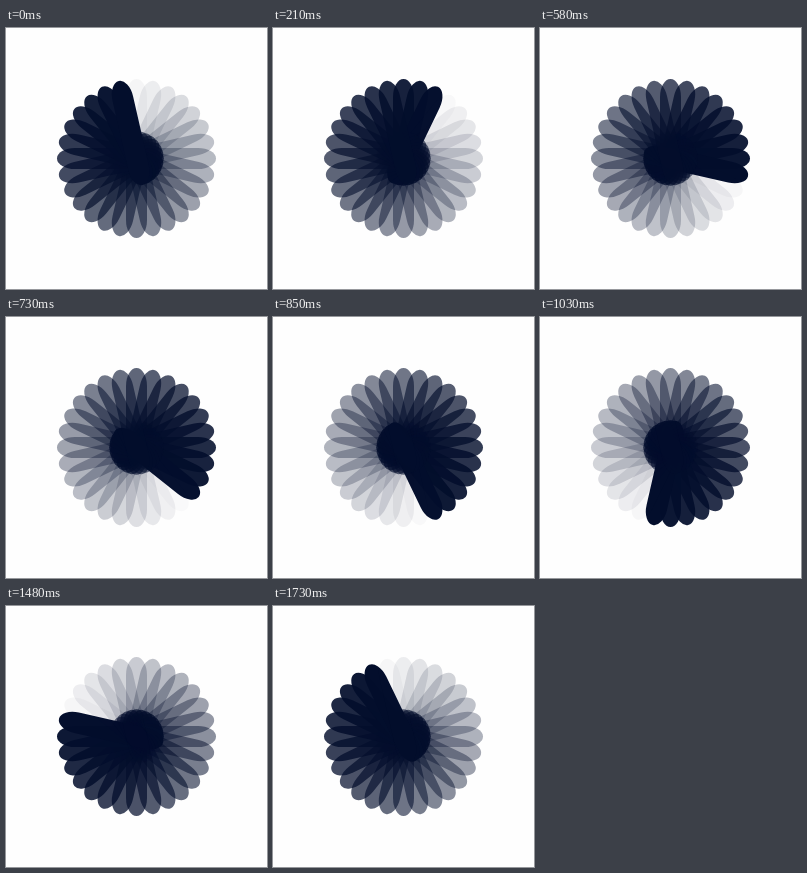
Write an HTML page that moves like this. It is 261x261 px and loops after 1790 ms.

```html
<!DOCTYPE html>
<html lang="en">
<head>
<meta charset="utf-8">
<title>Spinner</title>
<style>
  html, body { margin: 0; width: 100%; height: 100%; overflow: hidden; background: #fefefe; }
  svg { display: block; width: 100vw; height: 100vh; }
  rect { fill: #030e2c; }
</style>
</head>
<body>
<svg viewBox="0 0 261 261"></svg>
<script>
const COUNT = 28, LOOP = 1790;
const petal = { half: 10.5, outer: 79.5, inner: 27.3, ry: 18 };

const svg = document.querySelector('svg');
const petals = Array.from({ length: COUNT }, (_, i) => {
  const rect = document.createElementNS(svg.namespaceURI, 'rect');
  const attrs = {
    x: -petal.half, y: -petal.outer,
    width: 2 * petal.half, height: petal.outer + petal.inner,
    rx: petal.half, ry: petal.ry,
    transform: `translate(130.5 130.5) rotate(${i * 360 / COUNT})`
  };
  for (const name in attrs) rect.setAttribute(name, attrs[name]);
  return svg.appendChild(rect);
});

// Each petal lights up in turn, then fades evenly over one loop.
function draw(now) {
  const head = COUNT - 1 + (now % LOOP) / LOOP * COUNT;
  petals.forEach((rect, i) => {
    const age = (head - i + COUNT) % COUNT;
    rect.setAttribute('opacity', 1 - age / COUNT);
  });
}

function tick() {
  draw(performance.now());
  requestAnimationFrame(tick);
}
tick();
</script>
</body>
</html>
```
